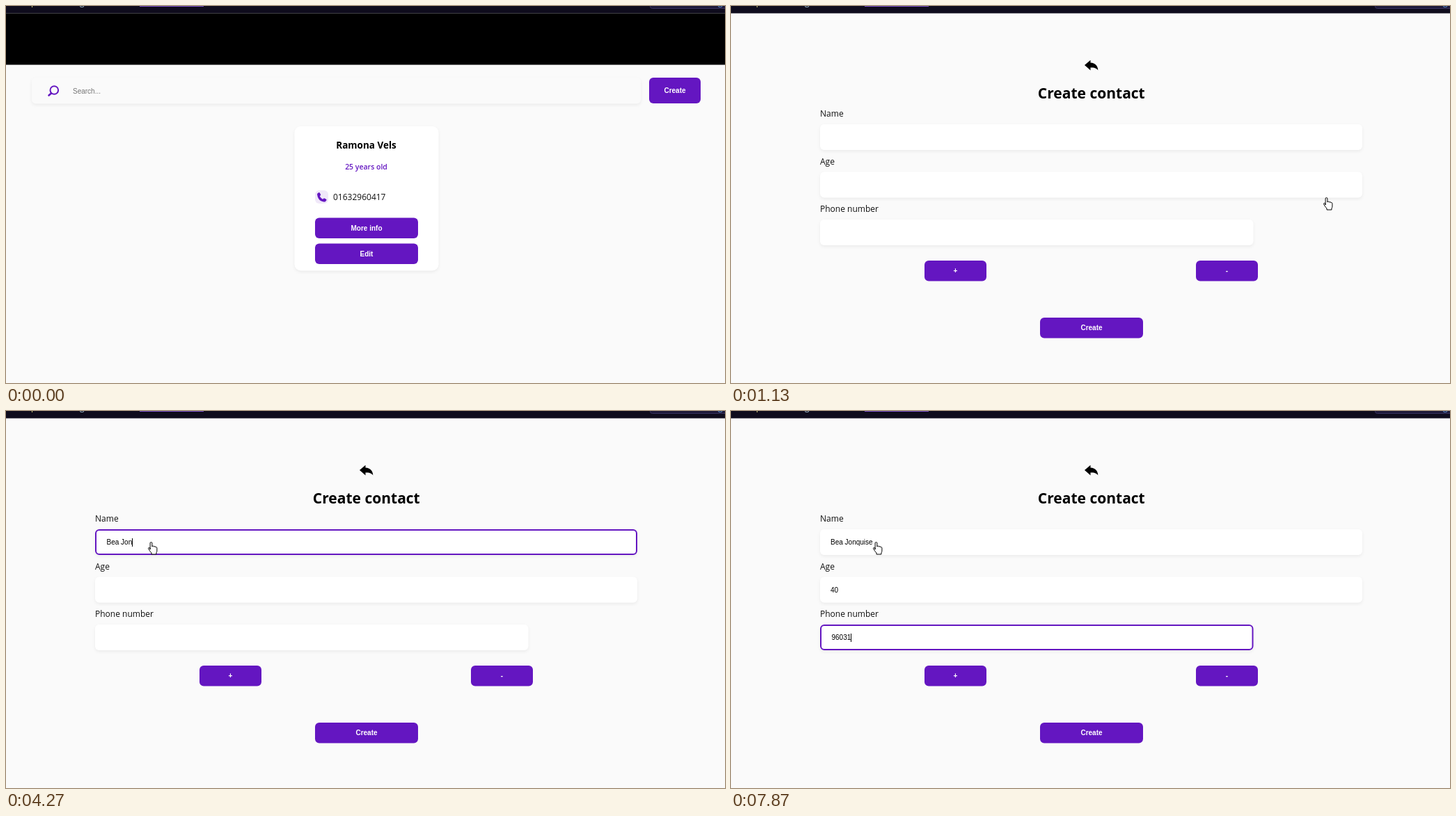
Recreate the animation shown at these times as an HTML page. Size 1033x542 px, loop 8000 ms.

```html
<!DOCTYPE html>
<html lang="en">
<head>
<meta charset="utf-8">
<title>Contacts</title>
<style>
  html, body { margin: 0; width: 100%; height: 100%; overflow: hidden; background: #fafafa; }
  svg { display: block; width: 100%; height: 100%; }
  text { font: 12px "Open Sans", sans-serif; fill: #111; white-space: pre; }
  .middle { text-anchor: middle; }
  .title { font-size: 21px; font-weight: 700; fill: #000; }
  .person { font-size: 13.5px; font-weight: 700; fill: #000; }
  .age { font-size: 10.5px; font-weight: 600; fill: #6416c1; }
  .input { font: 10px "Liberation Sans", Arial, sans-serif; fill: #000; }
  .hint { fill: #757575; }
  .label { font: bold 10px "Liberation Sans", Arial, sans-serif; fill: #fff; text-anchor: middle; }
  .button { fill: #6416c1; }
  .raised { fill: #fff; filter: drop-shadow(0 2px 2px rgba(0, 0, 0, .06)); }
  .flat { fill: #fafafa; }
  .ring { fill: none; stroke: #6416c1; stroke-width: 2; }
  .pointer { fill: #fff; stroke: #000; stroke-linejoin: round; }
</style>
</head>
<body>
<svg id="stage" viewBox="0 0 1033 542"></svg>
<script>
const LOOP = 8000;
const TICK = 1000 / 15;

// Ticks at which the pages and the pointer change state
const POINTER_IN = 5, HOVER = 11, PAGE_CHANGE = 17;

const pointerPath = [ // tick, x, y
  [5, 464, 222], [12, 957, 124], [14, 957, 124], [15, 960, 135],
  [16, 956, 172], [17, 855.5, 276], [24, 208.5, 189]
];

const fields = [
  { label: 'Name', y: 170, width: 779, value: 'Bea Jonquise', focus: 1600, blur: 5130,
    blink: [2130, 2670],
    keys: [2930, 3130, 3200, 3670, 3930, 4130, 4270, 4400, 4670, 4760, 4840, 4930] },
  { label: 'Age', y: 238.5, width: 779, value: '40', focus: 5130, blur: 6330,
    blink: [5670, 5930], keys: [5930, 6130], spinner: true },
  { label: 'Phone number', y: 307, width: 622.5, value: '96031', focus: 6330, blur: LOOP,
    blink: [6870, 7130], keys: [7130, 7270, 7530, 7670, 7870] }
];

const button = (x, y, w, h, label, id = '') => `
  <g id="${id}">
    <rect class="button" x="${x}" y="${y}" width="${w}" height="${h}" rx="6"/>
    <text class="label" x="${x + w / 2}" y="${Math.round(y + h / 2 + 3.6)}">${label}</text>
  </g>`;

const fieldMarkup = ({ label, y, width, spinner }) => `
  <text x="128" y="${Math.round(y - 11)}">${label}</text>
  <rect class="raised" x="128" y="${y}" width="${width}" height="37" rx="6"/>
  <g class="focus">
    <rect class="ring" x="129" y="${y + 1}" width="${width - 2}" height="35" rx="5"/>
    ${spinner ? `<rect x="896" y="249" width="9" height="16" fill="#ececec"/>
    <path d="M898 255l2.5-2.5 2.5 2.5M898 259.5l2.5 2.5 2.5-2.5" fill="none" stroke="#555" stroke-width="1.2"/>` : ''}
  </g>
  <text class="input value" y="${Math.round(y + 22)}"></text>
  <rect class="caret" y="${Math.round(y + 13)}" width="1" height="12"/>`;

const stage = document.getElementById('stage');
stage.innerHTML = `
  <rect width="1033" height="542" fill="#fafafa"/>
  <rect width="1033" height="10.5" fill="#0f0c1d"/>
  <text x="36" y="-1" style="fill:#d6cf7c">p</text>
  <text x="106" y="-1" style="fill:#a9c8dc">g</text>
  <rect x="192" width="92" height="1" fill="#7d52c9"/>
  <rect x="925.5" y="-8" width="120" height="11.5" rx="3" fill="#1d1939" stroke="#38325f"/>
  <text x="1023" y="-1" style="fill:#5f9fe0">g</text>

  <g id="home">
    <rect y="10.5" width="1033" height="74" fill="#000"/>
    <rect class="raised flat" x="37" y="103" width="875" height="37.5" rx="6"/>
    <path d="M65 125.5L61.5 128.5" stroke="#6416c1" stroke-width="2.6" stroke-linecap="round"/>
    <circle cx="69.3" cy="121" r="5.8" fill="none" stroke="#6416c1" stroke-width="2"/>
    <text class="input hint" x="96" y="125.5">Search...</text>
    ${button(924, 103, 74, 37, 'Create', 'create')}
    <rect class="raised" x="414.5" y="173" width="207" height="207.5" rx="9"/>
    <text class="person middle" x="517.5" y="205">Ramona Vels</text>
    <text class="age middle" x="517.5" y="235">25 years old</text>
    <rect x="444" y="265" width="19" height="19" rx="6" fill="#f0e8f9"/>
    <path d="M447 270l2.5-2q1 0 1.5 1l1.3 2.6-1.5 2q1.5 2.7 4.2 4.2l2-1.5 2.6 1.3q1 .5 1 1.5l-2 2.5q-10.6 0-11.6-11.6z" fill="#6416c1"/>
    <text x="470" y="279">01632960417</text>
    ${button(444, 304.5, 148, 29.5, 'More info')}
    ${button(444, 341.5, 148, 29.5, 'Edit')}
  </g>

  <g id="form">
    <path d="M508 85L516.5 77.7V81.6C523.5 82 527 86 527.3 92.5C525 89 521.5 88.5 516.5 88.5V92.5Z"/>
    <text class="title middle" x="517.8" y="133">Create contact</text>
    ${fields.map(fieldMarkup).join('')}
    ${button(278, 366, 89, 29.5, '+')}
    ${button(668, 366, 89, 29.5, '-')}
    ${button(444, 448, 148, 29.5, 'Create')}
  </g>

  <g id="pointer" class="pointer">
    <path id="arrow" d="M0 0V12.5l3-2.8 2.2 4.6 1.8-.8-2.1-4.5h4.1z"/>
    <path id="hand" d="M-1.4 10V1a1.4 1.4 0 0 1 2.8 0V6q.2-1 1.4-.9 1.2 .1 1.3 1.2 .3-.8 1.3-.6 1.1 .2 1.1 1.3 .4-.6 1.1-.3 .8 .3 .8 1.4V12q0 1.6-1 3V17H.5V15q-1.8-1.7-3-3.8l-1.4-2.4q-.4-1 .5-1.4 .9-.3 1.5 .5z"/>
  </g>`;

const byId = id => document.getElementById(id);
const show = (node, visible) => node.setAttribute('display', visible ? 'inline' : 'none');
const parts = name => [...stage.querySelectorAll('.' + name)];
const rings = parts('focus'), values = parts('value'), carets = parts('caret');

function pointerAt(tick) {
  const next = pointerPath.findIndex(point => point[0] > tick);
  if (next < 0) return pointerPath.at(-1).slice(1);
  if (next === 0) return pointerPath[0].slice(1);
  const [t0, x0, y0] = pointerPath[next - 1], [t1, x1, y1] = pointerPath[next];
  const u = (tick - t0) / (t1 - t0), eased = u * (2 - u);
  return [x0 + (x1 - x0) * eased, y0 + (y1 - y0) * eased];
}

function isClickable(x, y, onForm) {
  if (!onForm) return x > 924 && x < 998 && y > 103 && y < 140;
  return fields.some(f => x > 128 && x < 128 + f.width && y > f.y - 1 && y < f.y + 39);
}

function drawField(field, i, time) {
  const focused = time >= field.focus && time < field.blur;
  const blinkedOff = time >= field.blink[0] && time < field.blink[1];
  const left = focused ? 144.5 : 143;
  show(rings[i], focused);
  values[i].setAttribute('x', left);
  values[i].textContent = field.value.slice(0, field.keys.filter(key => key <= time).length);
  show(carets[i], focused && !blinkedOff);
  if (focused) {
    const end = left + values[i].getComputedTextLength();
    carets[i].setAttribute('x', Math.floor(Math.max(145, end)));
  }
}

function draw(time) {
  const tick = Math.floor((time + 4) / TICK);
  const onForm = tick >= PAGE_CHANGE;
  show(byId('home'), !onForm);
  show(byId('form'), onForm);
  byId('create').setAttribute('opacity', tick < HOVER ? 1 : tick === HOVER ? .87 : .75);
  if (onForm) fields.forEach((field, i) => drawField(field, i, time));

  const [x, y] = pointerAt(tick);
  const clickable = isClickable(x, y, onForm);
  show(byId('pointer'), tick >= POINTER_IN);
  show(byId('hand'), clickable);
  show(byId('arrow'), !clickable);
  byId('pointer').setAttribute('transform', `translate(${x} ${y})`);
}

const start = performance.now();
function frame() {
  draw((performance.now() - start) % LOOP);
  requestAnimationFrame(frame);
}
frame();
</script>
</body>
</html>
```
